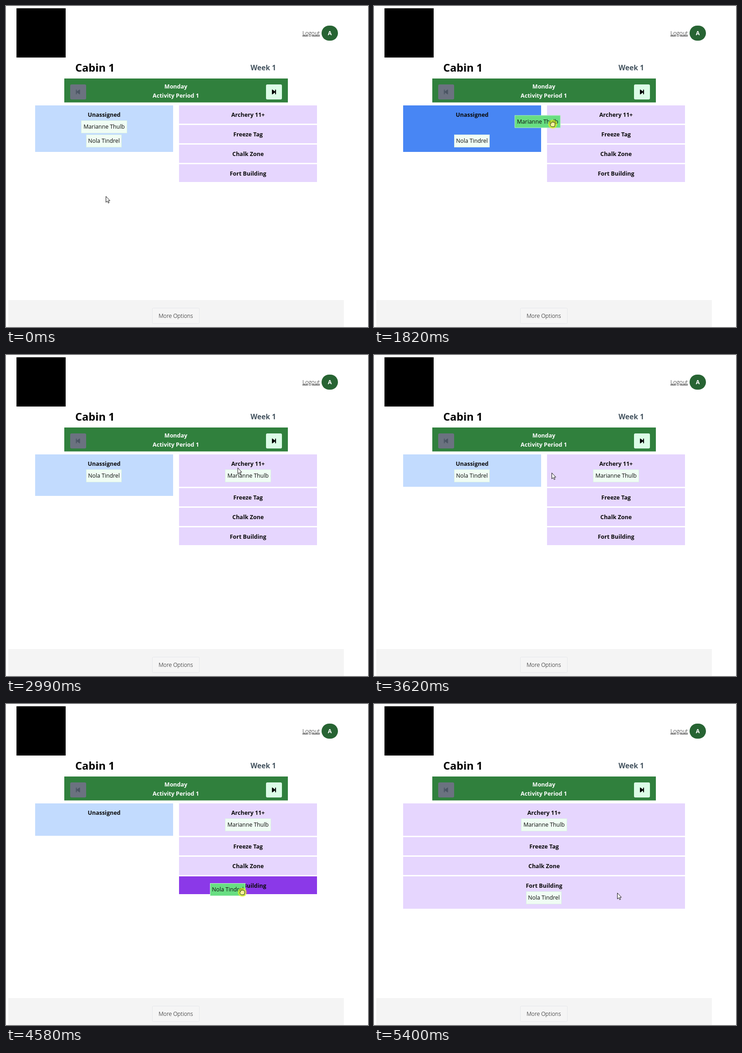
An HTML page that plays this animation: 795 px wide and 704 px high, repeating every 7050 ms.

```html
<!DOCTYPE html>
<html lang="en">
<head>
<meta charset="utf-8">
<title>Cabin activity planner</title>
<style>
  :root {
    --blue: #c2dbfe; --blue-over: #4886f4;
    --violet: #e6d6fe; --violet-over: #8b39e8;
    --mint: #f0fdf4; --lift: #68de82;
  }
  html, body { margin: 0; width: 100%; height: 100%; overflow: hidden; background: #fff; }
  body { position: relative; font: 12.3px/20px "Open Sans", "Noto Sans", sans-serif; color: #0a0a0a; }
  svg { position: absolute; left: 0; top: 0; overflow: visible; }
  .b { font-weight: 700; font-size: 12.5px; }
  .light { font-weight: 300; font-size: 12.2px; }
  .mid { text-anchor: middle; }

  /* 1% of the loop is 70.5 ms */
  .anim { animation: 7.05s step-end infinite; }

  .panel { box-sizing: border-box; height: 40px; padding-top: 10.5px; text-align: center; background: var(--violet); }
  .pool { position: absolute; left: 64px; top: 218px; width: 303px; animation-name: pool; }
  .acts { position: absolute; top: 218px; display: flex; flex-direction: column; gap: 3px; animation-name: widen; }
  .archery { animation-name: archery; }
  .fort { animation-name: fort; }

  .chip {
    position: absolute; left: 0; top: 0; box-sizing: border-box; height: 28px; padding-top: 3px;
    margin-top: -14px; text-align: center; white-space: nowrap;
    background: var(--mint); border: 1px solid #dcf3e6;
  }
  .one { width: 101px; margin-left: -50px; animation-name: move-one, lift-one; }
  .two { width: 78px; margin-left: -39px; animation-name: move-two, lift-two; }

  .cursor { animation-name: move-cursor; }
  .arrow { animation-name: arrow; }
  .hand { animation-name: hand; }
  .fist { animation-name: fist; }

  @keyframes pool {
    0% { height: 102px; background: var(--blue); }
    20% { background: var(--blue-over); }
    26.54% { background: var(--blue); }
    41.4% { height: 98px; }
    42.4% { height: 91px; }
    43.4% { height: 82px; }
    44.4% { height: 75px; }
    45.5% { height: 71px; }
    58% { background: var(--blue-over); }
    60% { background: var(--blue); visibility: visible; }
    76.59%, 100% { height: 71px; visibility: hidden; }
  }
  @keyframes widen {
    0% { left: 64px; left: 380px; width: 303px; }
    76.59%, 100% { left: 64px; width: 619px; }
  }
  @keyframes archery {
    0% { height: 40px; background: var(--violet); }
    26.54% { background: var(--violet-over); }
    41.4%, 100% { height: 71px; background: var(--violet); }
  }
  @keyframes fort {
    0% { height: 39px; background: var(--violet); }
    63.95% { background: var(--violet-over); }
    76.59%, 100% { height: 71px; background: var(--violet); }
  }

  @keyframes lift-one {
    20% { background: var(--lift); border-color: #c4f5d0; z-index: 2; }
    41.4%, 100% { background: var(--mint); border-color: #dcf3e6; z-index: 1; }
  }
  @keyframes lift-two {
    58% { background: var(--lift); border-color: #c4f5d0; z-index: 2; }
    76.59%, 100% { background: var(--mint); border-color: #dcf3e6; z-index: 1; }
  }

  @keyframes move-one {
    0%, 20% { translate: 215px 265px; animation-timing-function: steps(3, start); }
    23.27% { translate: 235px 264px; animation-timing-function: steps(4, start); }
    27.63% { translate: 400px 250px; animation-timing-function: steps(3, start); }
    30.9%, 36.45% { translate: 508px 237px; animation-timing-function: steps(5, start); }
    41.4% { translate: 531px 265px; }
    76.59%, 100% { translate: 373px 265px; }
  }
  @keyframes move-two {
    0%, 26.54% { translate: 215px 296px; animation-timing-function: steps(3, start); }
    29.8%, 58% { translate: 215px 265px; animation-timing-function: steps(2, start); }
    60% { translate: 215px 278px; animation-timing-function: steps(3, start); }
    62.95% { translate: 275px 402px; animation-timing-function: steps(3, start); }
    65.95% { translate: 487px 407px; animation-timing-function: steps(2, start); }
    67.93%, 70.63% { translate: 535px 404px; animation-timing-function: steps(6, start); }
    76.59%, 100% { translate: 373px 425px; }
    76.58% { translate: 531px 425px; }
  }
  @keyframes move-cursor {
    0%, 8.65% { translate: 219px 417px; animation-timing-function: steps(5, start); }
    14.6% { translate: 200px 312px; animation-timing-function: steps(4, start); }
    19.35%, 20% { translate: 207px 275px; animation-timing-function: steps(3, start); }
    23.27% { translate: 250px 272px; animation-timing-function: steps(4, start); }
    27.63% { translate: 440px 255px; animation-timing-function: steps(3, start); }
    30.9%, 47.37% { translate: 508.5px 247px; animation-timing-function: steps(3, start); }
    50.69% { translate: 440px 253px; animation-timing-function: steps(3, start); }
    53.99% { translate: 290px 268px; animation-timing-function: steps(3, start); }
    57.3%, 58% { translate: 213.5px 275px; animation-timing-function: steps(2, start); }
    60% { translate: 215px 315px; animation-timing-function: steps(3, start); }
    62.95% { translate: 300px 419px; animation-timing-function: steps(3, start); }
    65.95% { translate: 519px 413px; animation-timing-function: steps(2, start); }
    67.93%, 100% { translate: 534px 414px; }
  }
  @keyframes arrow {
    0%, 36.45%, 70.63%, 100% { visibility: visible; }
    14.6%, 55.1% { visibility: hidden; }
  }
  @keyframes hand {
    0%, 20%, 58%, 100% { visibility: hidden; }
    14.6%, 55.1% { visibility: visible; }
  }
  @keyframes fist {
    0%, 36.45%, 70.63%, 100% { visibility: hidden; }
    20%, 58% { visibility: visible; }
  }
</style>
</head>
<body>

<svg width="795" height="704">
  <rect x="23" y="5" width="108" height="108"/>
  <text class="light" x="651" y="64" text-decoration="underline">Logout</text>
  <rect x="693" y="43" width="36" height="33" rx="16.5" fill="#276433"/>
  <text class="b mid" x="711" y="64" fill="#fff">A</text>

  <text class="b" x="152" y="144" style="font-size:23.6px">Cabin 1</text>
  <text class="b mid" x="565" y="141" fill="#44535f" style="font-size:15.6px">Week 1</text>

  <rect x="128" y="159" width="491" height="52.5" fill="#30803d"/>
  <g class="b mid" fill="#fff">
    <text x="373" y="180.5">Monday</text>
    <text x="373" y="200.5">Activity Period 1</text>
  </g>
  <rect x="141" y="172" width="35" height="33" rx="3" fill="#6b7280"/>
  <path d="M153.5 183.5h2v4l6-4.2q1-.5 1 .6v9.2q0 1.1-1 .6l-6-4.2v4h-2z" fill="#4b5563"/>
  <rect x="571" y="172" width="35" height="33" rx="3" fill="#dcfce7"/>
  <path d="M593 183.5h-2v4l-6-4.2q-1-.5-1 .6v9.2q0 1.1 1 .6l6-4.2v4h2z"/>

  <rect x="5" y="645" width="737" height="59" fill="#f4f4f4"/>
  <rect x="321.5" y="662.5" width="103" height="34" rx="2" fill="#f5f5f5" stroke="#e5e7eb"/>
  <text class="light mid" x="373" y="684">More Options</text>
</svg>

<div class="panel pool anim b">Unassigned</div>
<div class="acts anim b">
  <div class="panel archery anim">Archery 11+</div>
  <div class="panel">Freeze Tag</div>
  <div class="panel">Chalk Zone</div>
  <div class="panel fort anim">Fort Building</div>
</div>

<div class="chip one anim">Marianne Thulb</div>
<div class="chip two anim">Nola Tindrel</div>

<svg width="795" height="704" style="z-index:3">
  <g class="cursor anim" fill="#fff" stroke="#111" stroke-linejoin="round">
    <path class="arrow anim" d="M.5.5V13.6L3.5 10.8 5.6 15.3 7.6 14.4 5.6 10H9.4z"/>
    <path class="hand anim" d="M-3 8.5C-4 5.500-6.500 3.500-6.500 2C-6.500.5-4.500.5-3.500 2.500L-4.500-2.500C-4.700-4.500-2.700-4.500-2.300-2.500L-1.700-.5V-4.500C-1.700-6.500.6-6.500.8-4.500L1-.5 1.800-4C2.200-5.700 4-5.400 3.800-3.500L3.400 0 4.600-2C5.500-3.400 7-2.500 6.500-1L4.500 5 3.700 8.500z"/>
    <g class="fist anim">
      <circle r="10" fill="#fff200" fill-opacity=".52" stroke="none"/>
      <path fill="#fff59a" stroke-width=".9" d="M-2.500 5.500C-4 3.500-5.500 2.500-5.500.5Q-5.300-1.200-3.800-.8L-4-2.500Q-3.500-4.300-2-3.500-1.500-5.300.2-4.200 1.700-5.300 2.600-3.600 4.800-4 5-1.800 5.400 2 3.500 5.500z"/>
    </g>
  </g>
</svg>

</body>
</html>
```
